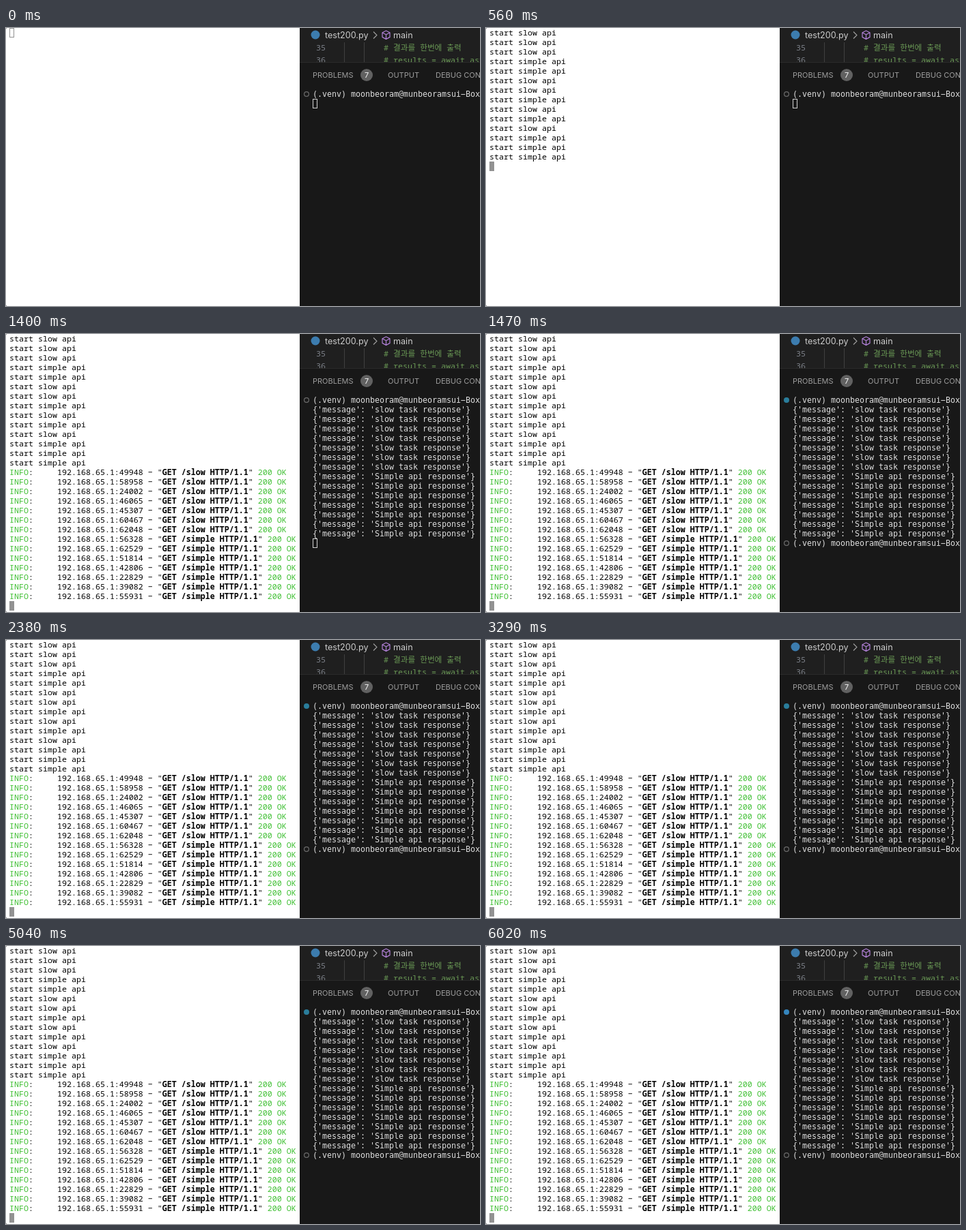
Recreate the animation shown at these times as an HTML page. Size 694x408 px, loop 6.09 s.

```html
<!DOCTYPE html>
<html lang="ko">
<head>
<meta charset="utf-8">
<title>Server log and client output</title>
<style>
  html, body { margin: 0; width: 100%; height: 100%; overflow: hidden; background: #fff; }
  svg { display: block; width: 694px; height: 408px; }
  text { white-space: pre; }
  .log { font: 11.667px "Noto Sans Mono", "Liberation Mono", monospace; fill: #000; }
  .log .ok { fill: #41c035; }
  .log .req { font-weight: 700; }
  .term { font: 11.63px "DejaVu Sans Mono", monospace; fill: #dedede; }
  .code { font: 11.667px "Noto Sans Mono", "Noto Sans CJK KR", "Noto Sans CJK", monospace; fill: #6a9955; }
  .num { fill: #7d8189; }
  .ui { font: 11px Inter, Roboto, sans-serif; fill: #9d9d9d; }
  .crumb { font-size: 12.6px; fill: #ccc; }

  /* One loop is 6090 ms; every change is a hard cut. */
  .anim { animation: 6090ms step-end infinite; }
  .focus { animation-name: focus; }
  .started { animation-name: started; }
  .slow { animation-name: slow; }
  .simple { animation-name: simple; }
  .done { animation-name: done; }
  .busy { animation-name: busy; }
  .log-cursor { animation-name: log-cursor; }
  .term-cursor { animation-name: term-cursor; }
  .dot { animation-name: dot; }

  @keyframes focus { 0% { fill: #fff; } 1.149%, 100% { fill: #929292; } }
  @keyframes started { 0% { visibility: hidden; } 5.747%, 100% { visibility: visible; } }
  @keyframes slow { 0% { visibility: hidden; } 14.942%, 100% { visibility: visible; } }
  @keyframes simple { 0% { visibility: hidden; } 22.988%, 100% { visibility: visible; } }
  @keyframes done { 0% { visibility: hidden; } 24.137%, 100% { visibility: visible; } }
  @keyframes busy { 0% { visibility: visible; } 24.137%, 100% { visibility: hidden; } }
  @keyframes log-cursor {
    0% { transform: translateY(0); }
    5.747% { transform: translateY(196px); }
    14.942% { transform: translateY(294px); }
    22.988%, 100% { transform: translateY(392px); }
  }
  @keyframes term-cursor {
    0% { transform: translateY(0); }
    14.942% { transform: translateY(98px); }
    22.988%, 100% { transform: translateY(196px); }
  }
  @keyframes dot { 0% { fill: #2a7d9b; } 98.85%, 100% { fill: #3585bd; } }
</style>
</head>
<body>
<svg viewBox="0 0 694 408">
  <rect width="694" height="408" fill="#fff"/>
  <path d="M0 0h1v1h-1zM0 407h1v1h-1z" fill="#888"/>

  <g id="log" class="log"></g>
  <g class="anim log-cursor">
    <rect class="anim focus" x="5.5" y=".5" width="6" height="13" stroke="#929292"/>
  </g>

  <rect x="430" width="264" height="408" fill="#181818"/>
  <rect x="430" width="264" height="50" fill="#1f1f1f"/>

  <path d="M495.5 21V50M524.5 21V50" stroke="#404040"/>
  <svg width="694" height="50">
    <g class="code">
      <text class="num" x="454" y="33">35</text>
      <text x="553" y="33"># 결과를 한번에 출력</text>
      <text class="num" x="454" y="51">36</text>
      <text x="553" y="51"># results = await asyncio</text>
    </g>
  </svg>
  <path d="M430 50.5H694" stroke="#2b2b2b"/>

  <circle cx="453" cy="10" r="6.5" fill="#3c7cae"/>
  <g class="ui">
    <text class="crumb" x="467" y="15">test200.py</text>
    <text class="crumb" x="567" y="15">main</text>
    <text x="449" y="73">PROBLEMS</text>
    <text x="559" y="73">OUTPUT</text>
    <text x="629" y="73">DEBUG CONSOLE</text>
  </g>
  <path d="M538 5.5l5 5-5 5" fill="none" stroke="#a0a0a0" stroke-width="1.1"/>
  <path d="M556.5 4l5.5 2.8v6.6l-5.5 3-5.5-3V6.8zM551 6.8l5.5 2.9 5.5-2.9M556.5 9.7v6.7"
        fill="none" stroke="#b180d7" stroke-width="1.2" stroke-linejoin="round"/>
  <circle cx="528" cy="69" r="9" fill="#616161"/>
  <text class="ui" x="528" y="73" text-anchor="middle" style="fill:#f8f8f8">7</text>

  <g id="term" class="term"></g>
  <g class="anim busy">
    <rect class="anim term-cursor" x="449.5" y="104.5" width="6" height="13" fill="none" stroke="#d0d0d0"/>
    <circle cx="440" cy="97" r="3.4" fill="none" stroke="#6c6c6c" stroke-width="1.2"/>
  </g>
  <g class="anim done">
    <circle class="anim dot" cx="440" cy="97" r="4"/>
    <circle cx="440" cy="307" r="3.4" fill="none" stroke="#6c6c6c" stroke-width="1.2"/>
  </g>
</svg>
<script>
  const ROW = 14;
  const PROMPT = '(.venv) moonbeoram@munbeoramsui\u2212Box';
  const CALLS = 'slow slow slow simple simple slow slow simple slow simple slow simple simple simple'.split(' ');
  const PORTS = [49948, 58958, 24002, 46065, 45307, 60467, 62048,
                 56328, 62529, 51814, 42806, 22829, 39082, 55931];

  const line = (x, y, cls, body) => `<text class="${cls}" x="${x}" y="${y}">${body}</text>`;
  const logLine = (row, cls, body) => line(5, 11 + row * ROW, 'anim ' + cls, body);
  const termLine = (row, cls, body) => line(449, 101 + row * ROW, cls, body);

  const kind = i => i < 7 ? 'slow' : 'simple';
  const access = (port, i) =>
    `<tspan class="ok">INFO</tspan>:     192.168.65.1:${port} \u2212 ` +
    `"<tspan class="req">GET /${kind(i)} HTTP/1.1</tspan>" <tspan class="ok">200 OK</tspan>`;
  const reply = i => `{'message': '${i < 7 ? 'slow task' : 'Simple api'} response'}`;

  document.getElementById('log').innerHTML =
    CALLS.map((name, i) => logLine(i, 'started', `start ${name} api`)).join('') +
    PORTS.map((port, i) => logLine(14 + i, kind(i), access(port, i))).join('');

  document.getElementById('term').innerHTML =
    termLine(0, '', PROMPT) +
    PORTS.map((_, i) => termLine(1 + i, 'anim ' + kind(i), reply(i))).join('') +
    termLine(15, 'anim done', PROMPT);
</script>
</body>
</html>
```
